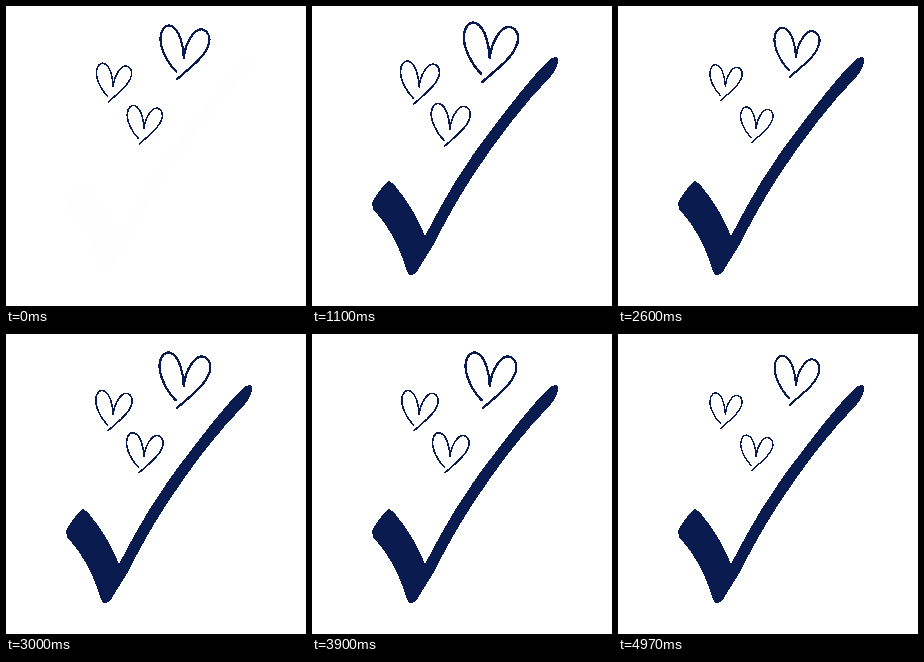
An HTML page for the animation above (5010 ms loop, 300 by 300 pixels).

```html
<!DOCTYPE html>
<html lang="en">
<head>
<meta charset="utf-8">
<title>Check mark with beating hearts</title>
<style>
  html, body { margin: 0; width: 100%; height: 100%; overflow: hidden; background: #fff; }
  svg { display: block; width: 100%; height: 100%; shape-rendering: crispEdges; }
  .heart { fill: none; stroke: #0a1c4f; stroke-linecap: round; stroke-linejoin: round; }
  #check { fill: #0a1c4f; }
</style>
</head>
<body>
<svg viewBox="0 0 300 300">
  <defs>
    <path id="shape" d="M-10 21.5 C-20 12 -28 -5 -27.5 -16 C-27 -26 -21 -32 -15 -29
      C-6 -25 -2 -7 -1.5 6 C0 -10 10 -27 19 -25.5 C27 -23.5 29 -14 25 -6 C20 7 4 18 -9 30"/>
  </defs>
  <path id="check" opacity="0" d="M60 197 C64 189 70 180 77 175 C80 176 82 179 84 181
    C95 194 106 212 113 230 C133 191 153 157 183 119 C202 94 219 72 236 55
    C239 52 243 50 246 52 C247 59 243 65 239 70 C211 99 184 134 160 171
    C145 194 133 216 122 238 C117 247 110 256 106 264 C104 268 101 270 98 269
    C96 269 95 265 94 262 C87 240 77 220 61 203 Z"/>
  <g id="hearts"></g>
</svg>
<script>
  const LOOP = 5010;
  const FADE = 700;
  const BEAT = { period: 900, peak: 170, half: 310, rest: 0.82 };
  const HEARTS = [
    { x: 179.2, y: 46.3, size: 1, line: 2.5 },
    { x: 108.2, y: 76.5, size: 0.72, line: 2.4 },
    { x: 139, y: 118.7, size: 0.72, line: 2.4 }
  ];

  const check = document.getElementById('check');
  const group = document.getElementById('hearts');
  const nodes = HEARTS.map(h => {
    const node = document.createElementNS('http://www.w3.org/2000/svg', 'use');
    node.setAttribute('href', '#shape');
    node.setAttribute('class', 'heart');
    node.setAttribute('stroke-width', h.line);
    return group.appendChild(node);
  });

  // Smooth swell around each peak, resting in between.
  function beatScale(t) {
    const { period, peak, half, rest } = BEAT;
    const d = (t - peak + period * 1.5) % period - period / 2;
    const swell = Math.abs(d) < half ? (1 + Math.cos(Math.PI * d / half)) / 2 : 0;
    return rest + (1 - rest) * swell;
  }

  function draw(t) {
    const p = Math.min(t / FADE, 1);
    check.setAttribute('opacity', 1 - (1 - p) ** 2);
    const s = beatScale(t);
    HEARTS.forEach((h, i) => {
      nodes[i].setAttribute('transform', `translate(${h.x} ${h.y}) scale(${s * h.size})`);
    });
  }

  const start = performance.now();
  function tick() {
    draw((performance.now() - start) % LOOP);
    requestAnimationFrame(tick);
  }
  draw(0);
  requestAnimationFrame(tick);
</script>
</body>
</html>
```
